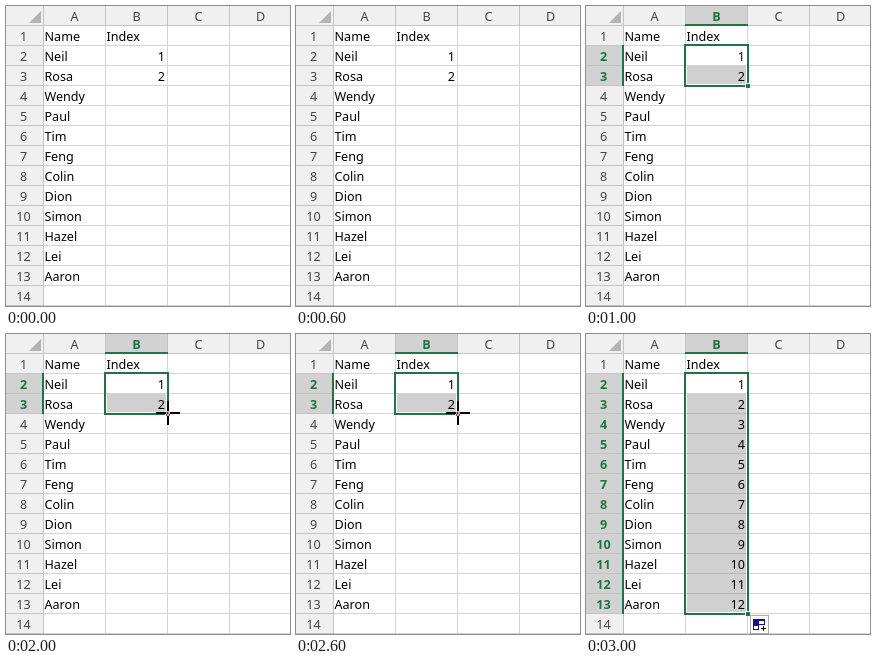
An HTML page that plays this animation: 284 by 300 pixels, repeating every 4000 ms.

```html
<!DOCTYPE html>
<html lang="en">
<head>
<meta charset="utf-8">
<title>Fill handle</title>
<style>
  html, body { margin: 0; width: 100%; height: 100%; overflow: hidden; background: #fff; }
  svg { display: block; width: 284px; height: 300px; }
  text { font: 12.6px "Noto Sans", "Open Sans", sans-serif; fill: #000; }
  .head { text-anchor: middle; fill: #444; }
  .on { font-weight: 700; fill: #217346; }
  .num { text-anchor: end; }
  #pair, #cursor, #column { visibility: hidden; animation: 4s step-end infinite; }
  #pair { animation-name: pair; }
  #cursor { animation-name: cursor; }
  #column { animation-name: column; }
  @keyframes pair { 0% { visibility: hidden } 25% { visibility: visible } 75%, 100% { visibility: hidden } }
  @keyframes cursor { 0% { visibility: hidden } 50% { visibility: visible } 75%, 100% { visibility: hidden } }
  @keyframes column { 0% { visibility: hidden } 75%, 100% { visibility: visible } }
</style>
</head>
<body>
<svg viewBox="0 0 284 300" shape-rendering="crispEdges">
  <g id="grid"></g>
  <g id="pair"></g>
  <g id="column"></g>
  <g id="labels"></g>
  <g id="cursor">
    <path d="M150 78h24v2h-24zM161 67h2v24h-2z" fill="#000"/>
    <path d="M160 78h4v2h-4zM161 77h2v5h-2z" fill="#de8cb9"/>
    <path d="M161 78h1v2h-1z" fill="#333"/>
  </g>
</svg>
<script>
  const GREEN = '#217346', LINE = '#d4d4d4', EDGE = '#c3c3c3', NAVY = '#14148c';
  const names = ['Neil', 'Rosa', 'Wendy', 'Paul', 'Tim', 'Feng', 'Colin', 'Dion', 'Simon', 'Hazel', 'Lei', 'Aaron'];
  const rect = (x, y, w, h, fill) => `<rect x="${x}" y="${y}" width="${w}" height="${h}" fill="${fill}"/>`;
  const text = (x, y, s, cls = '') => `<text x="${x}" y="${y}" class="${cls}">${s}</text>`;
  const base = row => row * 20 + 15;
  const put = (id, html) => { document.getElementById(id).innerHTML = html; };

  function grid() {
    let s = rect(0, 0, 284, 19, '#f0f0f0') + rect(0, 0, 37, 300, '#f0f0f0');
    for (let y = 19; y < 300; y += 20) s += rect(37, y, 247, 1, LINE) + rect(0, y, 37, 1, EDGE);
    for (let x = 37; x < 284; x += 62) s += rect(x, 19, 1, 281, LINE) + rect(x, 0, 1, 19, EDGE);
    s += rect(0, 19, 284, 1, EDGE) + rect(37, 0, 1, 300, EDGE);
    s += '<path d="M35 5v12H23z" fill="#b4b4b4" shape-rendering="auto"/>';
    [...'ABCD'].forEach((c, i) => { s += text(68.5 + i * 62, 15, c, 'head'); });
    for (let r = 1; r <= 14; r++) s += text(17.5, base(r), r, 'head');
    return s;
  }

  // Selection of column B from row 2 down, with lit headers
  function selection(count) {
    const end = 40 + count * 20;
    let s = rect(100, 0, 61, 18, '#d2d2d2') + rect(99, 18, 63, 2, GREEN) + text(130.5, 15, 'B', 'head on');
    for (let i = 0; i < count; i++) {
      const y = 40 + i * 20, last = i === count - 1;
      s += rect(0, y, 36, 19, '#d2d2d2') + text(17.5, base(i + 2), i + 2, 'head on');
      if (i) s += rect(101, y, 59, last ? 18 : 19, '#d0d0d0');
      if (i && !last) s += rect(101, y + 19, 59, 1, '#b8b8b8');
    }
    s += rect(36, 39, 2, end - 39, GREEN);
    s += rect(98, 38, 65, 2, GREEN) + rect(98, 38, 2, end - 37, GREEN);
    s += rect(161, 38, 2, end - 41, GREEN) + rect(98, end - 1, 61, 2, GREEN);
    s += rect(159, end - 3, 5, 5, '#fff') + rect(160, end - 2, 4, 4, GREEN);
    return s;
  }

  function fillButton() {
    return rect(164, 281, 19, 19, '#ababab') + rect(165, 282, 17, 17, '#fff')
      + rect(167, 285, 12, 6, NAVY) + rect(173, 287, 5, 3, '#fff')
      + rect(167, 291, 6, 5, NAVY) + rect(168, 292, 4, 3, '#fff')
      + rect(175, 294, 5, 1, '#000') + rect(177, 292, 1, 5, '#000');
  }

  const value = n => text(159, base(n + 1), n, 'num');
  const rest = names.map((_, i) => i < 2 ? '' : value(i + 1)).join('');

  put('grid', grid());
  put('pair', selection(2));
  put('column', selection(12) + rest + fillButton());
  put('labels', text(38.5, base(1), 'Name') + text(100.5, base(1), 'Index')
    + names.map((n, i) => text(38.5, base(i + 2), n)).join('') + value(1) + value(2));
</script>
</body>
</html>
```
